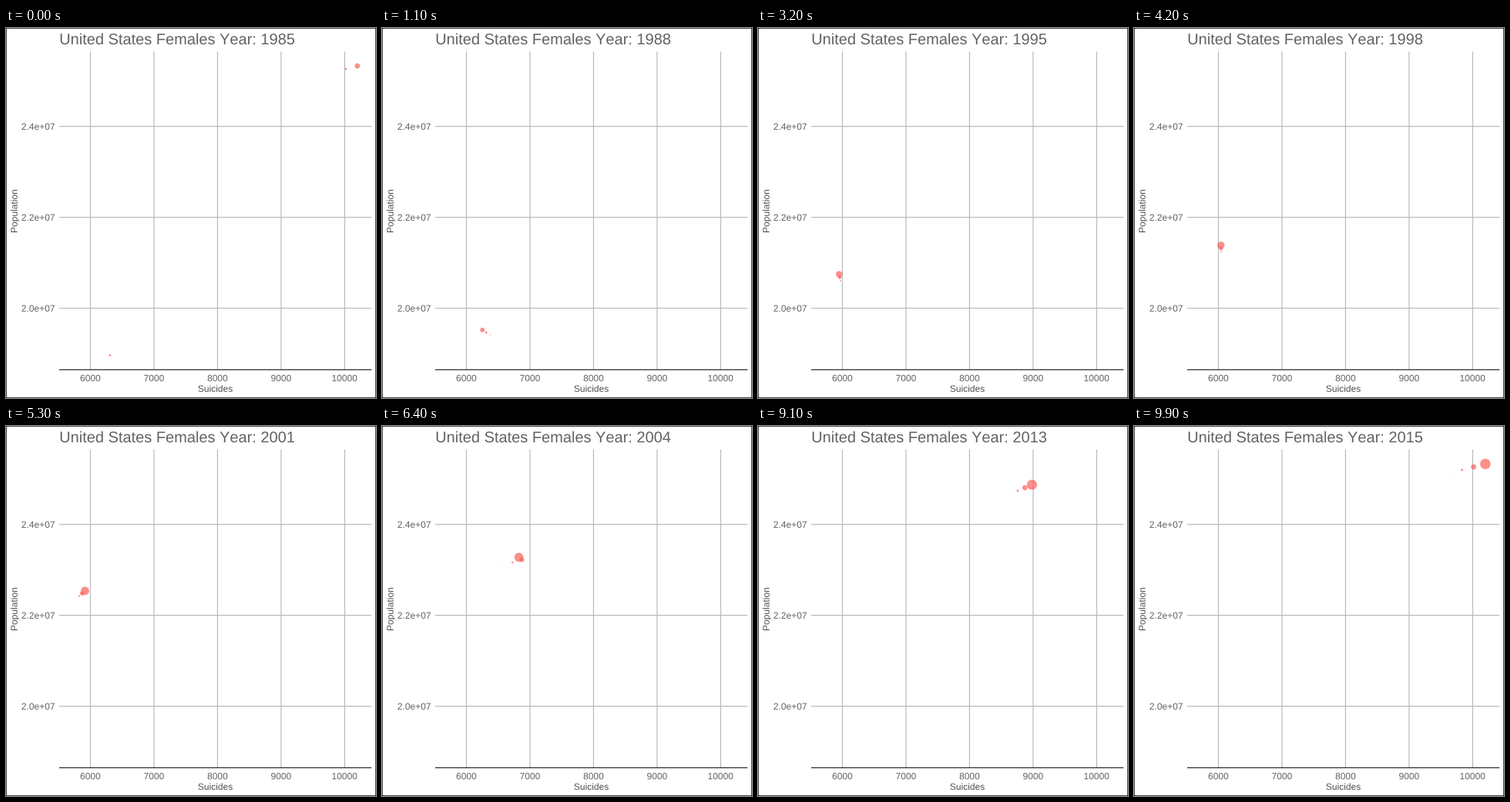
Animation, 480 px wide and 480 px high, one loop 10000 ms. Source, as a matplotlib script:

```python
import numpy as np
import matplotlib.pyplot as plt
from matplotlib.animation import FuncAnimation
from matplotlib.patches import Circle, PathPatch, Rectangle
from matplotlib.textpath import TextPath
from matplotlib.transforms import Affine2D

plt.rcParams.update({
    "font.family": "Liberation Sans",
    "text.kerning_factor": 6,
    "toolbar": "None",
})

SIZE, FRAMES, START, SPAN = 480, 100, 1985, 30
LEFT, RIGHT, TOP, BOTTOM = 69.0, 474.2, 30.5, 443.3
GREY, DARK, GRID, DOT = "#626262", "#505050", "#b8b8b8", "#f8605a"

# Turning points as year: value; the years between follow straight lines.
SUICIDES = {1985: 6308, 1986: 6678, 1989: 6130, 1996: 5905, 1997: 6043,
            1998: 6037, 1999: 5741, 2000: 5732, 2003: 6281, 2004: 6873,
            2005: 6730, 2010: 8087, 2013: 9094, 2015: 10199}
MILLIONS = {1985: 18.965, 1991: 19.966, 1999: 21.67, 2000: 22.31,
            2004: 23.22, 2009: 24.066, 2010: 24.35, 2015: 25.33}


def per_frame(points):
    """Yearly values pinned to whole frames, linear in between."""
    years = np.arange(START, START + SPAN + 1)
    yearly = np.interp(years, list(points), list(points.values()))
    keys = np.round(1 + (years - START) * (FRAMES - 1) / SPAN) - 1
    return np.interp(np.arange(FRAMES), keys, yearly)


def scale(values, start, end):
    """Linear map with 5% padding on both sides of the data."""
    lo, hi = values.min(), values.max()
    pad = 0.05 * (hi - lo)
    return lambda v: start + (v - lo + pad) / (hi - lo + 2 * pad) * (end - start)


deaths, people = per_frame(SUICIDES), per_frame(MILLIONS)
to_x, to_y = scale(deaths, LEFT, RIGHT), scale(people, BOTTOM, TOP)
xs, ys = to_x(deaths), to_y(people)
share = (people - people.min()) / (people.max() - people.min())
radii = 1.067 * (1.33 + 5 * np.sqrt(share))
wake = [(1 - age / 5) ** 3 for age in range(4)]

fig = plt.figure(figsize=(SIZE / 72, SIZE / 72), dpi=72, facecolor="white")
ax = fig.add_axes([0, 0, 1, 1])
ax.set_xlim(0, SIZE)
ax.set_ylim(SIZE, 0)
ax.axis("off")


def line(x, y, color):
    ax.plot(x, y, color=color, lw=1.16, solid_capstyle="butt", snap=False,
            zorder=1)


def label(x, y, text, size=12, color=GREY, align=0.5, angle=0):
    """Text as outlines; align 0 starts at x, 0.5 centres, 1 ends there."""
    path = TextPath((0, 0), text, size=size)
    shift = align * (path.get_extents().x1 + (align == 0.5) * path.get_extents().x0)
    place = (Affine2D().translate(-shift, 0).scale(1, -1)
             .rotate_deg(-angle).translate(x, y))
    return ax.add_patch(PathPatch(path, fc=color, lw=0, snap=False, zorder=2,
                                  transform=place + ax.transData))


def heading(year):
    return f"United States Females Year: {year}"


for v in (20, 22, 24):
    y = to_y(v)
    line([LEFT, RIGHT], [y, y], GRID)
    label(63, y + 4.3, f"{v / 10:.1f}e+07", align=1)
for v in range(6000, 10001, 1000):
    x = to_x(v)
    line([x, x], [TOP, BOTTOM], GRID)
    label(x, 458.3, str(v))
line([LEFT, RIGHT], [BOTTOM, BOTTOM], "#1a1a1a")

label((LEFT + RIGHT) / 2, 472, "Suicides", color=DARK)
label(14.7, 237.5, "Population", color=DARK, angle=90)
title = label(69.2, 21.2, heading(START), size=20, align=0)

ax.add_patch(Rectangle((0, 0), SIZE, SIZE, fill=False, ec="black", lw=1.4,
                       snap=False, clip_on=False, zorder=5))
dots = [ax.add_patch(Circle((0, 0), 1, fc=DOT, alpha=0.7, lw=0, zorder=3))
        for _ in wake]


def update(i):
    year = round(START + SPAN * i / (FRAMES - 1))
    title.set_path(TextPath((0, 0), heading(year), size=20))
    for age, (dot, k) in enumerate(zip(dots, wake)):
        j = (i - age) % FRAMES
        dot.center = xs[j], ys[j]
        dot.radius = radii[j] * k
    return [title, *dots]


anim = FuncAnimation(fig, update, frames=FRAMES, interval=100, repeat=True,
                     repeat_delay=0)
plt.show()
```
